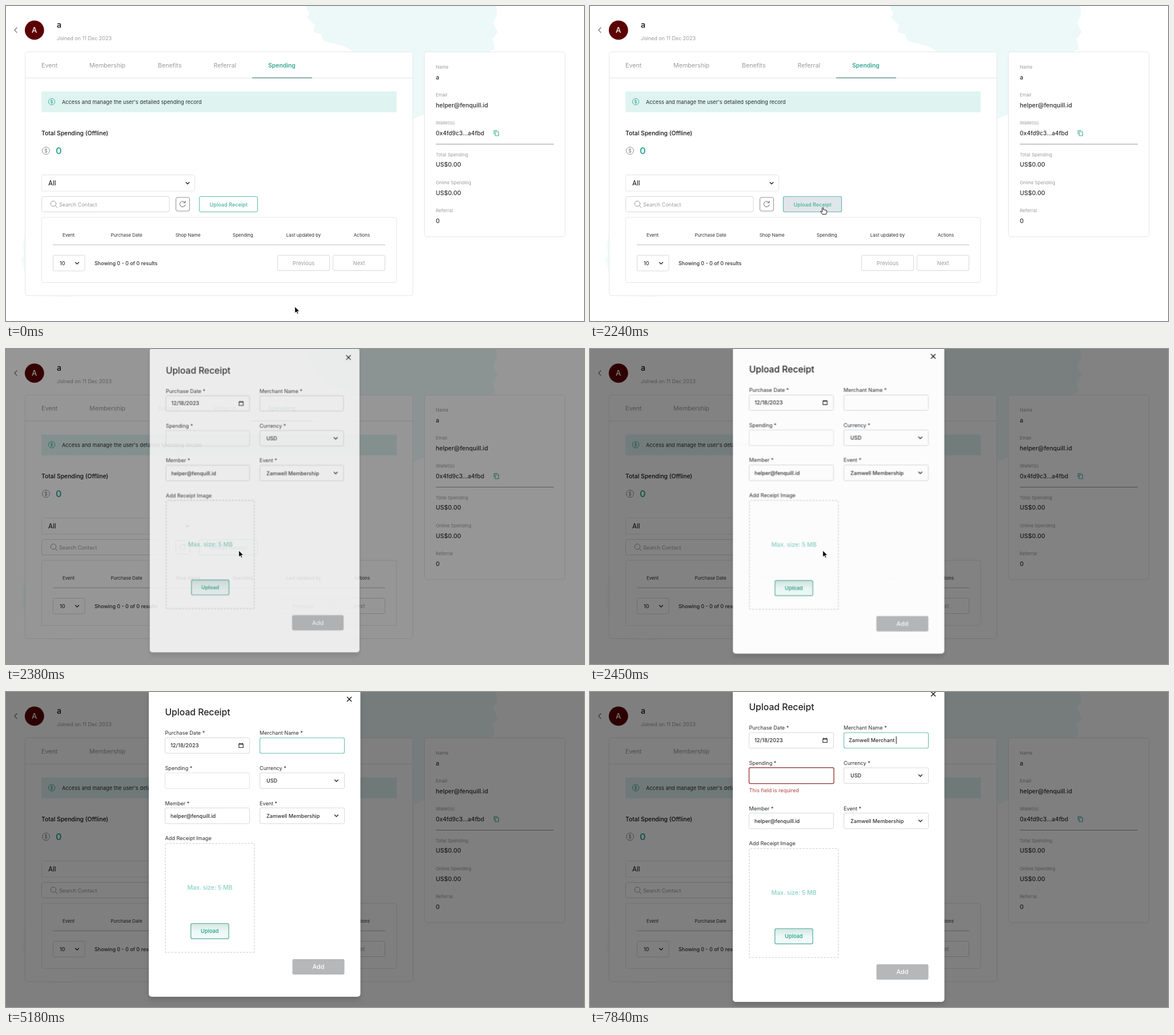
These frames come from a looping animation (1012x553 px, 8 s). An HTML page:

```html
<!DOCTYPE html>
<html lang="en">
<head>
<meta charset="utf-8">
<title>Upload receipt</title>
<style>
  html, body { margin: 0; width: 100%; height: 100%; overflow: hidden; background: #fff; }
  svg { display: block; width: 100vw; height: 100vh; }
  text { font-family: Inter, "Open Sans", sans-serif; font-size: 9.1px; fill: #2c2e30; white-space: pre; }
  .mid { text-anchor: middle; }
  .med { font-weight: 500; }
  .mute { fill: #999b9d; }
  .teal { fill: #36a894; }
  .tab { font-size: 10.7px; }
  .head text { font-size: 8px; text-anchor: middle; }
  .label { font-size: 8px; fill: #999b9d; }
  .value { font-size: 10.5px; font-weight: 500; }
  .box { fill: #fff; stroke: #e4e6e8; }
  .field { fill: #fff; stroke: #d6d8db; }
  .line { fill: none; stroke: #222; stroke-width: 1.3; stroke-linecap: round; stroke-linejoin: round; }

  .anim { animation: 8s step-end infinite; }
  #hover { animation-name: hover; }
  #dim, #modal { animation-name: appear; }
  #modal { transform-origin: 435.25px 265.25px; animation-name: appear, grow; }
  #panel { animation-name: panel; filter: drop-shadow(0 6px 4px rgba(0, 0, 0, .13)); }
  .upper { animation-name: up; }
  .lower { animation-name: down; }
  #focus { animation-name: focus; }
  #invalid { animation-name: invalid; }
  #error { animation-name: error; }

  @keyframes hover {
    0% { opacity: 0 } 26.25% { opacity: .4 } 27.125% { opacity: .8 }
    28% { opacity: 1 } 28.875% { opacity: .6 } 29.75%, 100% { opacity: 0 }
  }
  @keyframes appear {
    0% { opacity: 0 } 28.875% { opacity: .47 } 29.75% { opacity: .82 }
    30.625% { opacity: .98 } 31.5%, 100% { opacity: 1 }
  }
  @keyframes grow {
    0% { transform: scale(.95) } 28.875% { transform: scale(.9735) } 29.75% { transform: scale(.991) }
    30.625% { transform: scale(.999) } 31.5%, 100% { transform: none }
  }
  @keyframes panel {
    0% { y: -4.5px; height: 539.5px } 65.625%, 100% { y: -13.5px; height: 557.5px }
  }
  @keyframes up { 0% { transform: none } 65.625%, 100% { transform: translateY(-9px) } }
  @keyframes down { 0% { transform: none } 65.625%, 100% { transform: translateY(9px) } }
  @keyframes focus {
    0% { opacity: 0 } 44.625% { opacity: .3 } 45.5% { opacity: .7 }
    46.375% { opacity: .92 } 47.25%, 100% { opacity: 1 }
  }
  @keyframes invalid {
    0% { opacity: 0 } 65.625% { opacity: .3 } 66.5% { opacity: .7 }
    67.375% { opacity: .92 } 68.25%, 100% { opacity: 1 }
  }
  @keyframes error { 0% { opacity: 0 } 65.625%, 100% { opacity: 1 } }
</style>
</head>
<body>
<svg viewBox="0 0 1012 553" preserveAspectRatio="none">
  <defs>
    <path id="chevron" class="line" d="M-3 -1.5L0 1.5L3 -1.5"/>
    <g id="coin" fill="none">
      <circle r="6.4"/>
      <path d="M2 -2.2C1.2 -3.4 -2 -3.2 -2 -1.5C-2 .4 2.1 -.4 2.1 1.6C2.1 3.3 -1.4 3.3 -2.2 2M0 -4V4"/>
    </g>
    <linearGradient id="mint" x2="0" y2="1">
      <stop offset="0" stop-color="#d3e6e1"/>
      <stop offset=".5" stop-color="#ecf9f6"/>
      <stop offset="1" stop-color="#f3fbf9"/>
    </linearGradient>
  </defs>

  <!-- page -->
  <path fill="#edf9f9" d="M525 0L531 14L527 20L541 34L538 46L552 50L556 62L590 70L612 82H713V198L733 190V82H838L856 76L852 58L861 46L853 30L860 14L858 0Z"/>
  <path fill="#f4fbfb" d="M33 404L28 420L31 436L26 446L33 466ZM60 509L110 511L128 508Z"/>

  <path class="line" d="M19 38L15 42.3L19 46.6" style="stroke:#777"/>
  <circle cx="49.8" cy="42.4" r="16.9" fill="#5b0202"/>
  <text class="mid med" x="49.7" y="47" style="font-size:13px;fill:#fff">A</text>
  <text class="med" x="89" y="38" style="font-size:14px;fill:#111">a</text>
  <text class="mute" x="89" y="60" style="font-size:9px">Joined on 11 Dec 2023</text>

  <rect class="box" x="33.5" y="80.5" width="679" height="428" rx="5"/>
  <path d="M34 126.5H712" stroke="#e0e3e5"/>
  <path d="M431 126.3H536" stroke="#6b968d" stroke-width="1.4"/>
  <g>
    <text class="tab mute" x="62" y="107.5">Event</text>
    <text class="tab mute" x="146" y="107.5">Membership</text>
    <text class="tab mute" x="266" y="107.5">Benefits</text>
    <text class="tab mute" x="363.5" y="107.5">Referral</text>
    <text class="tab teal" x="459" y="107.5" style="font-weight:600;font-size:10.4px">Spending</text>
  </g>

  <rect x="62" y="150" width="622" height="36.5" fill="#dff4f1"/>
  <use href="#coin" transform="translate(80 168) scale(.88)" stroke="#36a894"/>
  <text x="98" y="171.5" style="font-size:9.2px">Access and manage the user's detailed spending record</text>

  <text class="med" x="62" y="227" style="font-size:10.35px;fill:#111">Total Spending (Offline)</text>
  <use href="#coin" x="70" y="254" stroke="#8b8d8f"/>
  <text class="teal" x="87" y="260" style="font-size:16px;font-weight:600">0</text>

  <rect class="box" x="62.5" y="296.5" width="268" height="28.5" rx="3"/>
  <text class="med" x="74" y="314.5" style="font-size:11.2px">All</text>
  <use href="#chevron" x="318" y="311"/>

  <rect class="field" x="62.5" y="334.5" width="223.5" height="27" rx="3"/>
  <g class="line" style="stroke:#999;stroke-width:1">
    <circle cx="83" cy="347" r="4.7"/>
    <path d="M86.5 350.5L90 354"/>
  </g>
  <text class="mute" x="93" y="351.5">Search Contact</text>

  <rect class="field" x="297.5" y="336" width="24" height="24" rx="3" style="stroke:#8f9193"/>
  <path class="line" d="M313.3 345A4.9 4.9 0 1 0 314 349M314 342.3V345.5H310.8" style="stroke:#666;stroke-width:1"/>

  <rect x="338.5" y="334.5" width="102" height="27" rx="2.5" fill="#fff" stroke="#5bbcab"/>
  <rect id="hover" class="anim" x="338.5" y="334.5" width="102" height="27" rx="2.5" fill="#e1e6ea" stroke="#6ab5b0" stroke-width="1.2"/>
  <text class="mid med" x="389.7" y="351.5" style="fill:#43b3a0">Upload Receipt</text>

  <rect class="box" x="62.5" y="371" width="621.5" height="114.5" rx="3"/>
  <g class="head">
    <text x="109.5" y="405">Event</text>
    <text x="211" y="405">Purchase Date</text>
    <text x="318.7" y="405">Shop Name</text>
    <text x="414.7" y="405">Spending</text>
    <text x="521" y="405">Last updated by</text>
    <text x="623" y="405">Actions</text>
  </g>
  <path d="M82 419.2H664" stroke="#b9bbbd"/>
  <rect class="field" x="82.5" y="437.5" width="55.5" height="27.5" rx="2.5"/>
  <text class="med" x="94" y="454.7" style="font-size:8.8px">10</text>
  <use href="#chevron" x="124.5" y="451.5"/>
  <text class="med" x="155" y="454.7" style="font-size:8.95px">Showing 0 - 0 of 0 results</text>
  <rect class="field" x="475.5" y="437.5" width="91" height="27" rx="2.5"/>
  <text class="mid mute" x="521" y="454.7" style="font-size:9.4px">Previous</text>
  <rect class="field" x="572.5" y="437.5" width="91" height="27" rx="2.5"/>
  <text class="mid mute" x="618.2" y="454.7" style="font-size:9.4px">Next</text>

  <rect class="box" x="732.5" y="80.5" width="246.5" height="324.5" rx="5"/>
  <g>
    <text class="label" x="752.5" y="109.7">Name</text>
    <text class="value" x="752.5" y="129">a</text>
    <text class="label" x="752.5" y="159">Email</text>
    <text class="value" x="752.5" y="177.5">helper@fenquill.id</text>
    <text class="label" x="752.5" y="208">Wallet(s)</text>
    <text class="value" x="752.5" y="226.7" style="font-size:10.1px">0x4fd9c3...a4fbd</text>
    <path class="line" d="M854.5 225V218.5H860M856.7 220.7H862.5V227.8H856.7Z" style="stroke:#3fae9b;stroke-width:1.1"/>
    <path d="M752.5 242.5H959" stroke="#96989a"/>
    <text class="label" x="752.5" y="263.7">Total Spending</text>
    <text class="value" x="752.5" y="282">US$0.00</text>
    <text class="label" x="752.5" y="312.7">Online Spending</text>
    <text class="value" x="752.5" y="331.5">US$0.00</text>
    <text class="label" x="752.5" y="362">Referral</text>
    <text class="value" x="752.5" y="380.7">0</text>
  </g>

  <rect id="dim" class="anim" width="1012" height="553" fill-opacity=".5"/>

  <!-- dialog -->
  <g id="modal" class="anim">
    <rect id="panel" class="anim" x="250" y="-4.5" width="370.5" height="539.5" rx="5" fill="#fff"/>
    <g class="anim upper">
      <path class="line" d="M597.5 9L604.7 16.2M604.7 9L597.5 16.2" style="stroke:#111"/>
      <text class="med" x="278.5" y="41" style="font-size:15.7px;fill:#222">Upload Receipt</text>

      <text x="278.5" y="75.3">Purchase Date *</text>
      <rect class="field" x="278.5" y="80.5" width="148" height="27" rx="2.5"/>
      <text class="med" x="288" y="97.3" style="font-size:9.3px">12/18/2023</text>
      <path class="line" d="M407.8 91H415.2V97.5H407.8ZM407.8 91.6H415.2M409.5 89.8V91M413.5 89.8V91" style="stroke-width:1.1"/>

      <text x="444" y="75.3">Merchant Name *</text>
      <rect class="field" x="444.5" y="80.5" width="148" height="27" rx="2.5"/>
      <rect id="focus" class="anim" x="444.5" y="80.5" width="148" height="27" rx="2.5" fill="#fff" stroke="#74bfb7" stroke-width="1.2"/>
      <text id="typed" class="med" x="453" y="97.3"></text>
      <rect id="caret" y="87" width="1" height="13" fill="#111"/>

      <text x="278.5" y="137">Spending *</text>
      <rect class="field" x="278.5" y="142" width="148" height="27.5" rx="2.5" style="stroke:#e1e3e5"/>
      <rect id="invalid" class="anim" x="278.5" y="141.8" width="148.5" height="28" rx="2.5" fill="#fff" stroke="#9c4a47" stroke-width="1.5"/>
      <text id="error" class="anim" x="278.5" y="184.9" style="fill:#b5443d">This field is required</text>

      <text x="444" y="137">Currency *</text>
      <rect class="field" x="444.5" y="142" width="148" height="27.5" rx="2.5"/>
      <text class="med" x="456" y="159">USD</text>
      <use href="#chevron" x="578.5" y="155.7"/>
    </g>

    <g class="anim lower">
      <text x="278.5" y="198.5">Member *</text>
      <rect class="field" x="278.5" y="203.5" width="148" height="27.5" rx="2.5"/>
      <text class="med" x="288" y="220.8">helper@fenquill.id</text>
      <text x="444" y="198.5">Event *</text>
      <rect class="field" x="444.5" y="203.5" width="148" height="27.5" rx="2.5"/>
      <text class="med" x="456" y="220.8">Zamwell Membership</text>
      <use href="#chevron" x="578.5" y="217.2"/>

      <text x="278.5" y="260.2">Add Receipt Image</text>
      <rect x="279" y="265.7" width="155.7" height="191.5" rx="2" fill="none" stroke="#d3d6d7" stroke-width="1.3" stroke-dasharray="3.5 2.2"/>
      <text class="mid med" x="357" y="347.3" style="font-size:10.5px;fill:#86d2c3">Max. size: 5 MB</text>
      <rect x="323.7" y="406.5" width="66.3" height="26.7" rx="2.5" fill="url(#mint)" stroke="#52a99a" stroke-width="1.2"/>
      <text class="mid teal" x="356.8" y="423.3" style="font-weight:600;font-size:9.2px">Upload</text>
      <rect x="501.5" y="469" width="91" height="27" rx="2.5" fill="#b6b7b9"/>
      <text class="mid med" x="547" y="486.3" style="font-size:10.8px;fill:#fff">Add</text>
    </g>
  </g>

  <!-- pointer -->
  <g id="pointer" stroke-linejoin="round">
    <path id="arrow" d="M0 0V11.6L2.7 9.1L4.5 13.2L6.4 12.4L4.6 8.4H8.2Z" stroke="#fff" stroke-width=".9"/>
    <path id="hand" d="M-1 6.5V.6Q0 -1.2 1.1 .6V4Q2.3 3.2 3.2 4.5Q4.4 3.7 5.2 5Q6.9 4.5 7 6.5V8.5L5.8 12H-.6L-4 7.5Q-3.8 5.8 -2.3 6.6L-1 8Z" fill="#fff" stroke="#111"/>
    <path id="beam" d="M-2.5 -6.5Q0 -6.5 0 -5V5Q0 6.5 -2.5 6.5M2.5 -6.5Q0 -6.5 0 -5M0 5Q0 6.5 2.5 6.5" fill="none" stroke="#333"/>
  </g>
</svg>
<script>
  const LOOP = 8000, TICK = 70;
  const $ = id => document.getElementById(id);
  const show = (id, on) => { $(id).style.visibility = on ? 'visible' : 'hidden'; };
  const within = (k, from, to) => k >= from && k < to;
  const ease = u => u * u * (3 - 2 * u);

  // pointer moves: first tick, last tick, end point
  const start = [505.7, 527.7];
  const moves = [[11, 22, 417.5, 375.5], [23, 28, 407.6, 353.7], [41, 49, 470, 98], [51, 51, 470, 106]];

  // tick at which each character is typed
  const name = 'Zamwell Merchant ';
  const keys = [75, 76, 78, 80, 83, 84, 85, 88, 90, 92, 93, 96, 98, 98, 102, 109, 112];

  function pointerAt(k) {
    let [x, y] = start;
    for (const [from, to, endX, endY] of moves) {
      if (k < from) break;
      const u = ease(Math.min(1, (k - from + 1) / (to - from + 1)));
      x += (endX - x) * u;
      y += (endY - y) * u;
    }
    return [x, y];
  }

  function draw(t) {
    const k = Math.floor(t / TICK);

    const [x, y] = pointerAt(k);
    const hand = k < 33 && y < 361;
    $('pointer').setAttribute('transform', `translate(${x} ${y})`);
    show('hand', hand);
    show('beam', within(k, 48, 55));
    show('arrow', k < 48 && !hand);

    const text = name.slice(0, keys.filter(key => key <= k).length);
    const typed = $('typed');
    if (typed.textContent !== text) typed.textContent = text;
    $('caret').setAttribute('x', 453 + (text ? typed.getComputedTextLength() : 0));
    show('caret', within(k, 51, 59) || within(k, 67, 74) || k >= 75);
  }

  let began;
  function frame(now) {
    began ??= now;
    draw((now - began) % LOOP);
    requestAnimationFrame(frame);
  }
  draw(0);
  requestAnimationFrame(frame);
</script>
</body>
</html>
```
